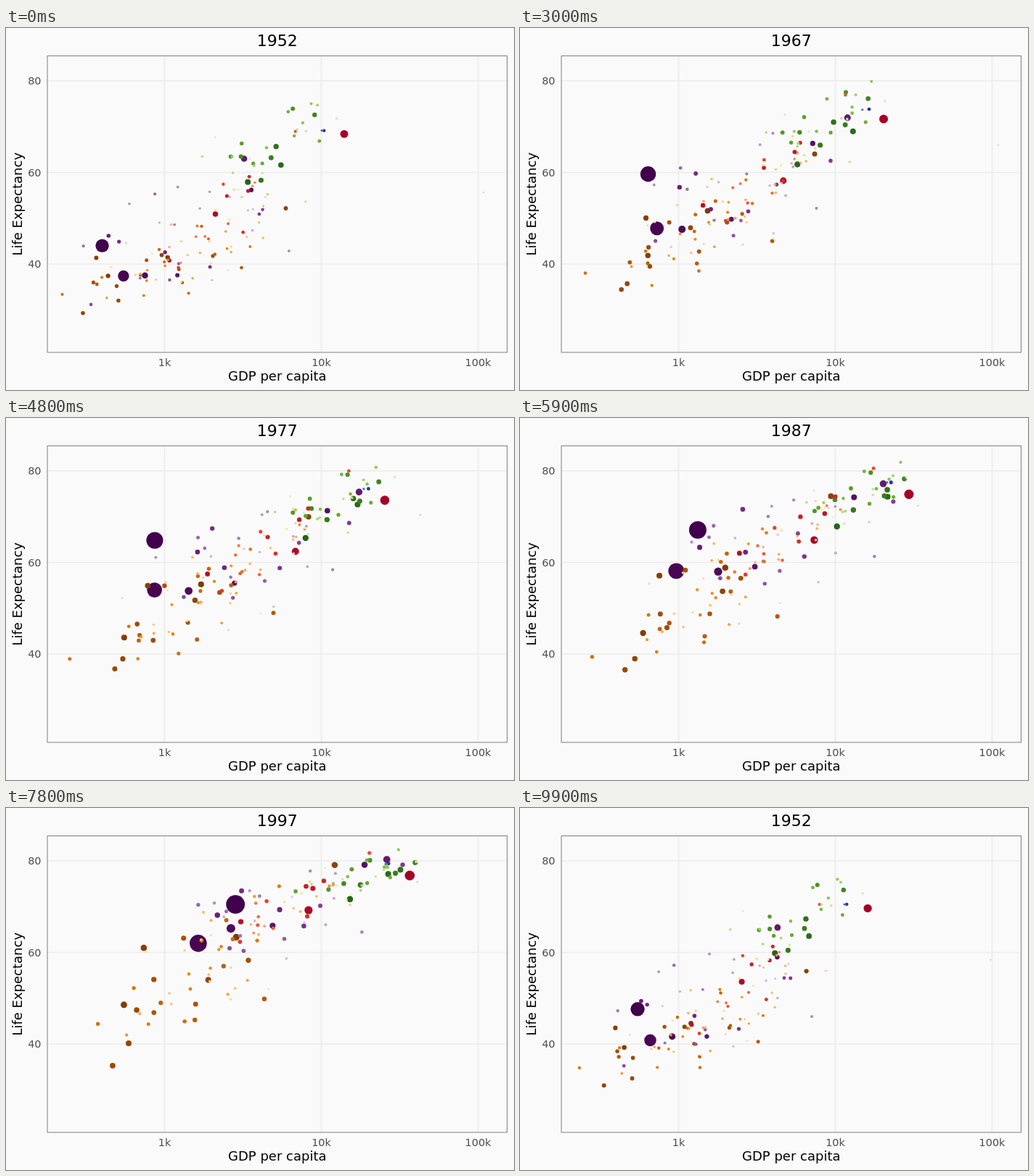
Recreate the animation shown at these times as an HTML page. Size 700 by 500 pixels, loop 10 s.

```html
<!DOCTYPE html>
<html lang="en">
<head>
<meta charset="utf-8">
<title>Life expectancy and GDP per capita</title>
<style>
  html, body { margin: 0; width: 100%; height: 100%; overflow: hidden; background: #fafafa; }
  svg { display: block; font: 18px "DejaVu Sans", sans-serif; text-anchor: middle; }
  .tick { font-size: 14.4px; fill: #4d4d4d; }
  .end { text-anchor: end; }
  .grid { stroke: #ebebeb; stroke-width: 1.7; }
</style>
</head>
<body>
<svg width="700" height="500" viewBox="0 0 700 500">
  <path class="grid" d="M57 73H690M57 199.5H690M57 326H690M218.5 38V448M434.5 38V448M650.5 38V448"/>
  <g id="dots"></g>
  <rect x="57" y="38.5" width="633.5" height="409.5" fill="none" stroke="#7f7f7f"/>
  <text id="year" x="373.75" y="25" font-size="22">1952</text>
  <text x="373.75" y="487">GDP per capita</text>
  <text transform="translate(22 243.25) rotate(-90)">Life Expectancy</text>
  <g class="tick">
    <text x="218.5" y="467">1k</text>
    <text x="434.5" y="467">10k</text>
    <text x="650.5" y="467">100k</text>
    <g class="end">
      <text x="48.5" y="78">80</text>
      <text x="48.5" y="204.5">60</text>
      <text x="48.5" y="331">40</text>
    </g>
  </g>
</svg>
<script>
const STATES = 12, FRAMES = 100;
const mix = (a, b, u) => a + (b - a) * u;

// Each continent drifts from its first to its last mean log GDP and life expectancy,
// while the spread of life expectancy changes too. Populations are in millions.
const continents = {
  africa: { count: 52, pop: 33, growth: 3.5, gdp: [3.01, 3.19], spread: 0.33,
    life: [39, 55], lifeSpread: [5, 9],
    ramp: ['#7f3b08', '#b35806', '#e08214', '#fdb863', '#fee0b6'] },
  americas: { count: 25, pop: 30, growth: 2.8, gdp: [3.48, 3.9], spread: 0.22,
    life: [53, 73], lifeSpread: [8, 4],
    ramp: ['#a50026', '#d73027', '#f46d43', '#fdae61', '#fee090'] },
  asia: { count: 33, pop: 45, growth: 2.9, gdp: [3.2, 3.8], spread: 0.45,
    life: [46, 70], lifeSpread: [8, 6],
    ramp: ['#40004b', '#762a83', '#9970ab', '#c2a5cf', '#e7d4e8'] },
  europe: { count: 30, pop: 69, growth: 1.3, gdp: [3.7, 4.36], spread: 0.22,
    life: [65, 77.5], lifeSpread: [5, 2.7],
    ramp: ['#276419', '#4d9221', '#7fbc41', '#b8e186', '#e6f5d0'] },
  oceania: { count: 2, pop: 8.7, growth: 2.3, gdp: [4.01, 4.45], spread: 0.03,
    life: [69.2, 80.7], lifeSpread: [0.2, 0.5],
    ramp: ['#313695', '#4575b4'] }
};

// The most conspicuous dots follow a few [year, GDP, life expectancy] points.
const leads = [
  { group: 'asia', rank: 0, pop: [556, 1319], path: [[1952, 400, 44], [1957, 576, 50.5],
    [1962, 488, 44.5], [1967, 613, 58.4], [1977, 741, 64], [1987, 1379, 67.3], [2007, 4959, 73]] },
  { group: 'asia', rank: 1, pop: [372, 1110],
    path: [[1952, 547, 37.4], [1987, 977, 58.5], [2007, 2452, 64.7]] },
  { group: 'asia', rank: 2, pop: [82, 224],
    path: [[1952, 750, 37.5], [1972, 1111, 49.2], [2007, 3541, 70.6]] },
  { group: 'asia', rank: 5, pop: [86, 127],
    path: [[1952, 3217, 63], [1972, 14779, 73.4], [2007, 31656, 82.6]] },
  { group: 'asia', rank: 32, pop: [0.2, 2.5],
    path: [[1952, 108382, 55.6], [1972, 109348, 67.7], [1982, 31354, 71.3], [2007, 47307, 77.6]] },
  { group: 'americas', rank: 0, pop: [158, 301],
    path: [[1952, 13990, 68.4], [1987, 29884, 75], [2007, 42952, 78.2]] },
  { group: 'americas', rank: 1, pop: [57, 190],
    path: [[1952, 2109, 50.9], [1977, 6660, 61.5], [2007, 9066, 72.4]] }
];

let seed = 1952;
function random() {
  seed = seed + 0x6d2b79f5 | 0;
  let t = Math.imul(seed ^ seed >>> 15, 1 | seed);
  t = t + Math.imul(t ^ t >>> 7, 61 | t) ^ t;
  return ((t ^ t >>> 14) >>> 0) / 2 ** 32;
}
const normal = () => 2 * (random() + random() + random() - 1.5);

function rampColor({ ramp, count }, rank) {
  const at = rank / (count - 1) * (ramp.length - 1);
  const i = Math.min(Math.floor(at), ramp.length - 2);
  const channel = (hex, k) => parseInt(hex.slice(k, k + 2), 16);
  return `rgb(${[1, 3, 5].map(k =>
    Math.round(mix(channel(ramp[i], k), channel(ramp[i + 1], k), at - i)))})`;
}

const place = (logGdp, life, pop) => ({
  cx: 218.5 + 216 * (logGdp - 3),
  cy: 326 - 6.325 * (life - 40),
  r: 1.2 + 0.338 * Math.sqrt(pop)
});

const eachState = make => Array.from({ length: STATES }, (_, s) => make(s / (STATES - 1)));

function leadStates({ pop, path }) {
  return eachState(u => {
    const year = mix(1952, 2007, u);
    const i = Math.max(1, path.findIndex(point => point[0] >= year - 1e-6));
    const [y0, gdp0, life0] = path[i - 1], [y1, gdp1, life1] = path[i];
    const v = (year - y0) / (y1 - y0);
    return place(mix(Math.log10(gdp0), Math.log10(gdp1), v), mix(life0, life1, v), mix(...pop, u));
  });
}

// Wealth and health wander slowly around the continent's trend and are correlated.
function smallStates({ count, pop, growth, gdp, spread, life, lifeSpread }, rank) {
  const size = pop * Math.exp(-4 * rank / count);
  let wealth = normal(), health = normal();
  return eachState(u => {
    const trend = 1 - (1 - u) ** 1.4;
    const state = place(
      mix(...gdp, trend) + spread * wealth,
      mix(...life, trend) + mix(...lifeSpread, u) * (0.65 * wealth + 0.7 * health),
      size * mix(1, growth, u));
    wealth = 0.985 * wealth + 0.17 * normal();
    health = 0.985 * health + 0.17 * normal();
    return state;
  });
}

const dots = [];
for (const [group, continent] of Object.entries(continents)) {
  for (let rank = 0; rank < continent.count; rank++) {
    const lead = leads.find(l => l.group === group && l.rank === rank);
    dots.push({
      color: rampColor(continent, rank),
      states: lead ? leadStates(lead) : smallStates(continent, rank)
    });
  }
}

const layer = document.getElementById('dots');
const title = document.getElementById('year');
dots.sort((a, b) => b.states[0].r - a.states[0].r);
for (const dot of dots) {
  dot.node = document.createElementNS('http://www.w3.org/2000/svg', 'circle');
  dot.node.setAttribute('fill', dot.color);
  layer.append(dot.node);
}

// Frame at which a state is reached: steps of 8, with four of 9 after the first.
const startOf = state => 8 * state + Math.max(0, Math.min(4, state - 1));

function draw() {
  const frame = Math.floor(performance.now() / 100) % FRAMES;
  let state = 0;
  while (startOf(state + 1) <= frame) state++;
  const next = (state + 1) % STATES;
  const u = (frame - startOf(state)) / (startOf(state + 1) - startOf(state));
  title.textContent = 1952 + 5 * (u > 0.5 ? next : state);
  for (const { node, states } of dots) {
    for (const key of ['cx', 'cy', 'r']) {
      node.setAttribute(key, mix(states[state][key], states[next][key], u).toFixed(2));
    }
  }
  requestAnimationFrame(draw);
}
draw();
</script>
</body>
</html>
```
